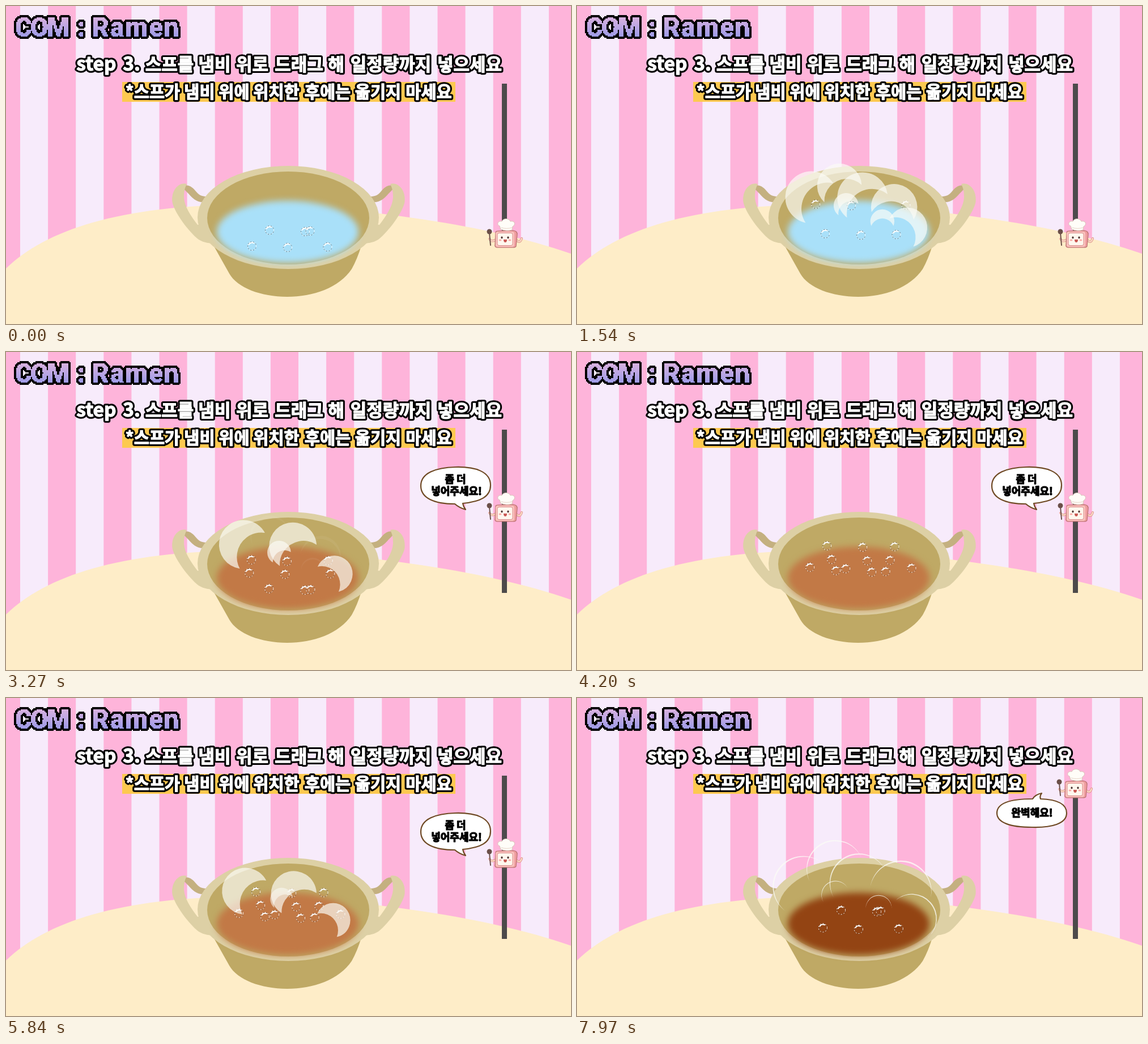
An HTML page with a canvas for the animation above (8 s loop, 997 by 561 pixels).

```html
<!DOCTYPE html>
<html lang="ko">
<head>
<meta charset="utf-8">
<title>COM : Ramen</title>
<style>
html, body { margin: 0; width: 100%; height: 100%; overflow: hidden; }
canvas { display: block; width: 997px; height: 561px; }
</style>
</head>
<body>
<canvas id="stage" width="997" height="561"></canvas>
<script>
const W = 997, H = 561, LOOP = 8000, TAU = Math.PI * 2;
const STEAM_MS = 1300, BUBBLE_MS = 410;
const KR = '"Noto Sans CJK KR", "Noto Sans CJK", sans-serif';
const ctx = document.getElementById('stage').getContext('2d');

// One entry per amount of soup; steam is the phase the steam starts with.
const scenes = [
  { start: 0, soup: '#a9e0f9', mascot: [0, 0], steam: 0.315 },
  { start: 3175, soup: '#c27946', mascot: [0, -127], steam: 0.35, say: 'more' },
  { start: 5882, soup: '#934413', mascot: [-2, -250], steam: 0.264, say: 'done' }
];

// Bubble paths inside one cycle: [phase, x, y]
const bubbles = [
  [[-0.02, 434, 427], [0, 434, 424], [0.09, 434, 406], [0.24, 429, 389], [0.34, 433, 380], [0.5, 449, 366], [0.6, 454, 356]],
  [[-0.04, 464, 404], [0, 465, 396], [0.09, 466, 375], [0.14, 466, 368]],
  [[0.17, 431, 374], [0.24, 433, 366], [0.34, 435, 355], [0.5, 441, 342], [0.6, 444, 335]],
  [[0.17, 466, 424], [0.24, 464, 417], [0.34, 461, 407], [0.5, 457, 386], [0.65, 454, 367]],
  [[0.42, 408, 389], [0.5, 411, 380], [0.756, 421, 350], [0.84, 424, 341]],
  [[0.66, 438, 413], [0.756, 438, 402], [0.9, 437, 386]]
];

// Steam puffs: birth phase, x, y, radius early and late, opening in degrees, lasting
const puffs = [
  { born: 0.33, a: [423, 341, 41], b: [398, 332, 54], open: 35 },
  { born: 0.42, a: [468, 328, 32], b: [455, 300, 51], open: 65, lasting: true },
  { born: 0.33, a: [508, 346, 40], b: [497, 325, 52], open: 60 },
  { born: 0.42, a: [552, 364, 32], b: [572, 340, 55], open: 100, lasting: true },
  { born: 0.33, a: [577, 392, 30], b: [592, 389, 44], open: 140 },
  { born: 0.36, a: [487, 355, 20], b: [455, 347, 25], open: 60 },
  { born: 0.42, a: [543, 386, 20], b: [532, 370, 23], open: 90 }
];

const mix = (a, b, u) => a + (b - a) * u;

function at(keys, t) {
  if (t <= keys[0][0]) return keys[0].slice(1);
  for (let i = 1; i < keys.length; i++) {
    const p = keys[i - 1], q = keys[i];
    if (t <= q[0]) {
      const u = (t - p[0]) / (q[0] - p[0]);
      return p.slice(1).map((v, j) => mix(v, q[j + 1], u));
    }
  }
  return keys[keys.length - 1].slice(1);
}

function shape(path, fill, line, width = 1) {
  const p = new Path2D(path);
  if (fill) { ctx.fillStyle = fill; ctx.fill(p); }
  if (line) { ctx.strokeStyle = line; ctx.lineWidth = width; ctx.stroke(p); }
}

function oval(x, y, rx, ry, fill, line, width = 1) {
  ctx.beginPath();
  ctx.ellipse(x, y, rx, ry, 0, 0, TAU);
  if (fill) { ctx.fillStyle = fill; ctx.fill(); }
  if (line) { ctx.strokeStyle = line; ctx.lineWidth = width; ctx.stroke(); }
}

function box(x, y, w, h, r, fill, line, width = 1) {
  ctx.beginPath();
  ctx.roundRect(x, y, w, h, r);
  ctx.fillStyle = fill;
  ctx.fill();
  if (line) { ctx.strokeStyle = line; ctx.lineWidth = width; ctx.stroke(); }
}

function boldText(s, x, y, color, extra) {
  ctx.fillStyle = ctx.strokeStyle = color;
  ctx.lineWidth = extra;
  ctx.strokeText(s, x, y);
  ctx.fillText(s, x, y);
}

// Words are given with the x of their centre.
function words(list, y, size) {
  ctx.font = `900 ${size}px ${KR}`;
  ctx.textAlign = 'center';
  for (const [x, s] of list) boldText(s, x, y, '#000', 7.5);
  for (const [x, s] of list) boldText(s, x, y, '#fff', 1.3);
}

function layer(w, h) {
  const c = document.createElement('canvas');
  c.width = w;
  c.height = h;
  return c;
}

// Blocky lettering: small text, hard edges, scaled up twice.
function makeTitle() {
  const w = 165, h = 36, mask = layer(w, h), out = layer(w, h);
  const m = mask.getContext('2d'), o = out.getContext('2d');
  const put = (s, x, gap) => {
    m.letterSpacing = gap + 'px';
    m.fillText(s, x, 27);
  };
  m.font = '900 23px Roboto, sans-serif';
  put('COM', 8, -1.5);
  put(':', 63, 0);
  put('Ramen', 76, 1);
  const img = m.getImageData(0, 0, w, h);
  for (let i = 3; i < img.data.length; i += 4) img.data[i] = img.data[i] > 110 ? 255 : 0;
  m.putImageData(img, 0, 0);
  for (let dx = -2; dx <= 2; dx++)
    for (let dy = -2; dy <= 2; dy++)
      if (Math.abs(dx) + Math.abs(dy) < 4) o.drawImage(mask, dx, dy);
  const g = m.createLinearGradient(0, 9, 0, 28);
  g.addColorStop(0, '#dcb2df');
  g.addColorStop(1, '#9a9ae8');
  m.globalCompositeOperation = 'source-in';
  m.fillStyle = g;
  m.fillRect(0, 0, w, h);
  o.drawImage(mask, 0, 0);
  return out;
}
const title = makeTitle();

function backdrop() {
  ctx.fillStyle = '#feb4da';
  ctx.fillRect(0, 0, W, H);
  ctx.fillStyle = '#f7ebfb';
  for (let x = 25; x < W; x += 98.2) ctx.fillRect(x, 0, 49.1, H);
  shape('M0 463C70 395 200 352 420 350C600 352 840 382 997 437V561H0Z', '#feedc8');
}

function heading() {
  ctx.imageSmoothingEnabled = false;
  ctx.drawImage(title, 0, 0, title.width * 2, title.height * 2);
  words([[159.5, 'step'], [221.5, '3.']], 114, 33.5);
  words([[288.5, '스프를'], [368, '냄비'], [434.5, '위로'], [517, '드래그'],
    [582.5, '해'], [679, '일정량까지'], [818, '넣으세요']], 114, 31);
  ctx.fillStyle = '#fdc950';
  ctx.fillRect(205, 134, 588, 35);
  words([[259, '*스프가'], [341.5, '냄비'], [402.5, '위에'], [477, '위치한'],
    [567.5, '후에는'], [656.5, '옮기지'], [746, '마세요']], 162, 29.5);
}

function handle() {
  shape('M316 317C324 315 330 321 336 328C341 334 346 336 354 336L347 346C336 346 329 339 322 331L313 322Z', '#c4b080');
  shape('M319 314C306 310 291 324 293.5 346C297 364 322 398 340 412C350 418 360 419 368 419L350 384L338 386C326 370 315 354 314 338C314 328 315 322 319 314Z', '#ddd0a5');
}

function pot(soup) {
  handle();
  ctx.save();
  ctx.translate(W, 0);
  ctx.scale(-1, 1);
  handle();
  ctx.restore();
  shape('M362 415L394 472C408 497 450 513 496 513C542 513 588 497 610 464Q620 446 627 423Z', '#bfa965');
  oval(498, 373, 160, 91, '#ddd0a5');
  oval(498, 374, 143, 82, '#bfa965');
  ctx.save();
  ctx.filter = 'blur(6px)';
  oval(497, 398.5, 125, 55, soup);
  ctx.restore();
}

function bubble(x, y) {
  ctx.setLineDash([2.5, 2.5]);
  for (const [color, shift] of [['rgba(255,255,255,.85)', 0], ['rgba(60,45,40,.5)', 2.5]]) {
    ctx.lineDashOffset = shift;
    oval(x, y, 7.6, 7.6, null, color);
  }
  ctx.setLineDash([]);
  ctx.strokeStyle = '#fff';
  ctx.lineWidth = 2;
  ctx.beginPath();
  ctx.arc(x, y, 6, 3.5, 5.4);
  ctx.stroke();
}

function boil(time) {
  const phase = (time / BUBBLE_MS) % 1;
  for (const path of bubbles) {
    const p = path[0][0] < 0 && phase > 0.9 ? phase - 1 : phase;
    if (p < path[0][0] || p > path[path.length - 1][0]) continue;
    const [x, y] = at(path, p);
    bubble(x, y);
    bubble(x + 63, y + 2.5);
    bubble(1001.5 - x, y + 1.5);
  }
}

function crescent(x, y, r, angle, thick) {
  const half = Math.acos(thick / (2 * r));
  ctx.beginPath();
  ctx.arc(x, y, r, angle + half, angle + TAU - half);
  ctx.arc(x + thick * Math.cos(angle), y + thick * Math.sin(angle), r,
    angle + Math.PI + half, angle + Math.PI - half, true);
  ctx.fill();
}

function steam(phase) {
  phase %= 1;
  const drift = Math.max(0, (phase - 0.4) / 0.5) ** 0.6;
  for (const p of puffs) {
    if (phase < p.born) continue;
    const [x, y, r] = p.a.map((v, i) => mix(v, p.b[i], drift));
    const [thick] = at([[p.born, 0.1], [p.born + 0.06, 0.95], [0.5, 0.76], [0.87, 0.045], [1, 0.02]], phase);
    const [alpha] = at([[p.born, 0], [p.born + 0.05, 0.68], [0.6, 0.68], [0.87, 0.8],
      [0.96, p.lasting ? 0.35 : 0], [1, 0]], phase);
    ctx.fillStyle = `rgba(252,252,246,${alpha})`;
    crescent(x, y, r, p.open * Math.PI / 180, thick * r);
  }
}

function mascot(dx, dy) {
  const line = '#b5716c';
  const arms = 'M863 413Q857 417 853 411M902 414Q907 419 910 410';
  ctx.save();
  ctx.translate(dx, dy);
  shape(arms, null, '#d98d84', 4);
  shape(arms, null, '#fbd9c4', 2.4);
  shape('M853 400L855 422', null, '#6b4f48', 2);
  oval(853, 398, 4.5, 4.5, '#6b4f48');
  shape('M867 397L895 396Q903 397 902 404L900 424Q899 426 895 426L866 426Q862 425 863 421L864 400Q864 397 867 397Z', '#ef9c9f', line, 1.2);
  box(864, 398, 33, 27, 4, '#f9c2bd');
  box(867, 400.5, 27, 22, 3, '#fff7ee', '#d98d8c');
  oval(875, 408.5, 1.6, 2, '#4b3331');
  oval(886, 408.5, 1.6, 2, '#4b3331');
  oval(872, 413, 2.4, 1.6, '#f9aaa6');
  oval(889, 413, 2.4, 1.6, '#f9aaa6');
  shape('M878 412H884Q884 417 881 417Q878 417 878 412Z', '#c95752');
  shape('M873 394L871 388C865 386 868 378 875 380C877 374 888 374 890 380C898 378 900 386 894 389L893 395Q883 398 873 394Z', '#fffdf8', '#d8c4b8');
  shape('M874 391Q883 394 893 391', null, '#e4d5c9');
  ctx.restore();
}

function speech(kind) {
  const more = kind === 'more';
  shape(more
    ? 'M793 203C828 202 855 211 855 235C855 255 838 264 806 267Q807 273 811 278Q800 275 792 268C756 268 732 258 732 236C732 213 759 204 793 203Z'
    : 'M804 178Q809 170 820 168Q816 173 818 178C847 179 864 187 864 203C864 222 837 229 803 228C765 228 741 220 741 203C741 185 767 178 804 178Z',
    '#fff', '#6f4a24', 2.2);
  ctx.font = `900 18px ${KR}`;
  ctx.textAlign = 'center';
  if (more) {
    boldText('좀 더', 793, 231, '#000', 1.3);
    boldText('넣어주세요!', 795, 252, '#000', 1.3);
  } else boldText('완벽해요!', 803, 209, '#000', 1.3);
}

function draw(t) {
  const scene = scenes.filter(s => t >= s.start).pop();
  const time = t - scene.start;
  ctx.lineJoin = ctx.lineCap = 'round';
  backdrop();
  heading();
  pot(scene.soup);
  ctx.lineCap = 'butt';
  boil(time);
  steam(scene.steam + time / STEAM_MS);
  ctx.lineCap = 'round';
  ctx.fillStyle = '#4d4a4b';
  ctx.fillRect(875, 137, 9, 288);
  mascot(...scene.mascot);
  if (scene.say) speech(scene.say);
}

const begin = performance.now();
function tick() {
  draw((performance.now() - begin) % LOOP);
  requestAnimationFrame(tick);
}
tick();
</script>
</body>
</html>
```
